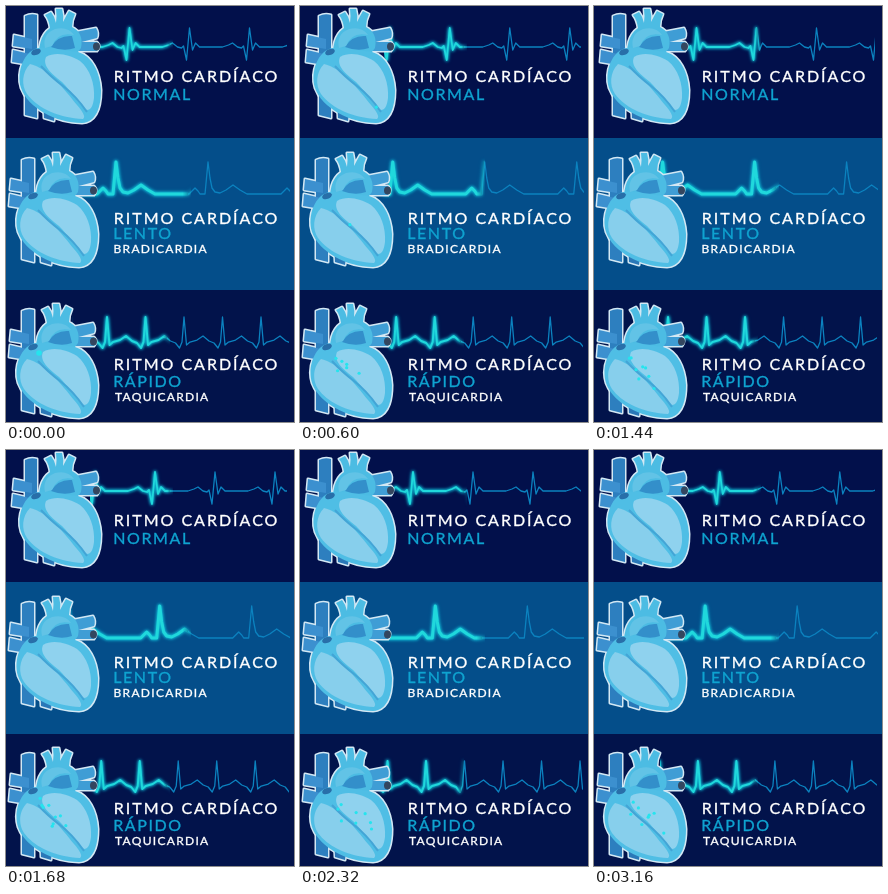
An HTML page for the animation above (3200 ms loop, 288 by 416 pixels).

```html
<!DOCTYPE html>
<html lang="es">
<head>
<meta charset="utf-8">
<title>Ritmo cardíaco</title>
<style>
html, body { margin: 0; width: 100%; height: 100%; overflow: hidden; background: #02104b; }
svg { display: block; width: 288px; height: 416px; }
text { font: 16px Lato, "Open Sans", sans-serif; letter-spacing: 2px; fill: #fff; stroke: #fff; stroke-width: .35px; }
.kind { letter-spacing: 1.6px; fill: #0fa3d0; stroke: #0fa3d0; }
.term { font-size: 12px; letter-spacing: 1.3px; }
.wave { fill: none; stroke-linejoin: round; }
.dot { fill: #25e4ee; }
</style>
</head>
<body>
<svg id="stage" viewBox="0 0 288 416">
  <defs>
    <linearGradient id="fade">
      <stop offset=".93" stop-color="#fff"/><stop offset="1" stop-color="#fff" stop-opacity=".2"/>
    </linearGradient>
    <g id="parts">
      <path fill="#2d7fbf" d="M19 10Q25 7 31 9V112L19 109Z"/>
      <path fill="#2a78b8" d="M37 88H51L48 115L38 112Z"/>
      <path fill="#3c90cf" d="M8 29L26 33V43L7 40Z M7 44L24 48V59L6 56Z"/>
      <path fill="#3f9dd5" d="M64 27L90 22Q93 27 91 32L64 39Z M68 36H91Q95 40 91 45H68Z"/>
      <path fill="#4cbce3" d="M34 58Q30 32 44 22Q43 14 39 9L45 6Q49 11 50 17Q51 9 50 3H56Q58 10 57 16Q60 10 63 5L69 8Q66 14 66 21Q78 27 75 42L60 62Z"/>
      <path fill="#4fbee5" d="M33 42C18 44 10 66 15 82C22 102 50 117 76 117C91 116 95 100 95 84C94 66 86 50 72 46C56 44 46 40 33 42Z"/>
    </g>
    <g id="heart">
      <use href="#parts" stroke="#d3e8f4" stroke-width="3" stroke-linejoin="round"/>
      <use href="#parts"/>
      <ellipse cx="90.5" cy="40.5" rx="3.5" ry="4" fill="#33465f"/>
      <path fill="#338fca" d="M45 41Q52 29 66 30L69 42Q58 46 45 41Z"/>
      <path fill="#62c3e6" d="M39 42Q36 28 49 23Q62 20 68 29Q52 25 46 40Z"/>
      <path fill="#87cfec" d="M24 58C16 66 15 79 21 88C32 103 54 112 77 113C80 111 77 106 71 99C58 83 42 62 24 58Z"/>
      <path fill="#8fd2ee" d="M40 51C50 45 64 49 74 55C84 63 89 78 88 92C87 100 85 104 81 104C72 98 66 86 56 76C46 68 36 60 40 51Z"/>
      <path fill="none" stroke="#43a5d6" stroke-width="2" d="M35 60Q44 70 57 80T81 106"/>
      <ellipse cx="30" cy="46" rx="5" ry="3" transform="rotate(-20 30 46)" fill="#286fa9"/>
    </g>
  </defs>
  <rect width="288" height="132" fill="#02104b"/>
  <rect y="132" width="288" height="152" fill="#044e8a"/>
  <rect y="284" width="288" height="132" fill="#02134b"/>
  <g id="waves"></g>
  <use href="#heart"/>
  <use href="#heart" x="-3" y="144"/>
  <use href="#heart" x="-3" y="295"/>
  <g id="dots"></g>
  <text x="107.7" y="76">RITMO CARDÍACO</text>
  <text x="107.2" y="93.5" class="kind">NORMAL</text>
  <text x="107.7" y="217.5">RITMO CARDÍACO</text>
  <text x="107.2" y="233" class="kind">LENTO</text>
  <text x="107.5" y="247" class="term">BRADICARDIA</text>
  <text x="107.7" y="364">RITMO CARDÍACO</text>
  <text x="107.2" y="381" class="kind">RÁPIDO</text>
  <text x="109" y="395" class="term">TAQUICARDIA</text>
</svg>
<script>
const LOOP = 3200, STEP = 40;
const $ = id => document.getElementById(id);

function add(parent, tag, attrs) {
  const el = document.createElementNS("http://www.w3.org/2000/svg", tag);
  for (const k in attrs) el.setAttribute(k, attrs[k]);
  return parent.appendChild(el);
}

// beat: x,y offsets from the main peak; beats: periods scrolled per loop
const rhythms = [
  { y: 41, peak: 123.5, period: 60, beats: 3, from: 84, split: 167, to: 281, width: 1.8,
    beat: [-27,0, -21,-2, -17,-4, -12,0, -8,1, -6,-1, -3,13, 0,-19, 3,3, 6,-4, 10,0, 24,0] },
  { y: 188, peak: 110, period: 92, beats: 1, from: 65, split: 185, to: 284, width: 3,
    beat: [-40,0, -19,0, -16,-3, -13,-6, -10,-3, -8,0, -3,0, 0,-32, 2,-16, 4,-6, 7,-2, 12,-1, 18,-4, 25,-9, 32,-4, 39,0, 52,0] },
  { y: 335, peak: 101, period: 38.5, beats: 6, from: 66, split: 164, to: 283, width: 2,
    beat: [-2,1, 0,-24, 2.5,4, 6,1, 13,-1, 19,-5, 25,0, 30,2, 34,7] }
];

function buildWave(r, i) {
  let d = "";
  for (let n = -2; n < 10; n++)
    for (let k = 0; k < r.beat.length; k += 2)
      d += (d ? "L" : "M") + (n * r.period + r.beat[k]) + " " + r.beat[k + 1];
  const defs = document.querySelector("defs");
  const box = { x: r.from, y: r.y - 60, width: r.split - r.from, height: 110 };
  const mask = add(defs, "mask", { id: "lit" + i, maskUnits: "userSpaceOnUse", ...box });
  add(mask, "rect", { ...box, fill: "url(#fade)" });
  const clip = add(defs, "clipPath", { id: "rest" + i });
  add(clip, "rect", { ...box, x: r.split - 3, width: r.to - r.split + 3 });

  const dim = add($("waves"), "g", { "clip-path": `url(#rest${i})` });
  const lit = add($("waves"), "g", { mask: `url(#lit${i})` });
  const glow = add(lit, "g", { style: "filter:drop-shadow(0 0 1.5px #10c4d8) drop-shadow(0 0 1.5px #0aa0c8)" });
  r.lines = [
    add(dim, "path", { class: "wave", d, stroke: "#0b82bf", "stroke-width": 1.3 }),
    add(glow, "path", { class: "wave", d, stroke: "#20d8dc", "stroke-width": r.width })
  ];
}
rhythms.forEach(buildWave);

let seed = 11;
const rand = () => (seed = seed * 16807 % 2147483647) / 2147483647;

// blood cells: each runs from the valve to its own place in the chambers
const cells = [];
function addCell(born, life, x0, y0, x1, y1, r = 1.6) {
  cells.push({ born, life, x0, y0, x1, y1, el: add($("dots"), "circle", { class: "dot", r }) });
}
addCell(0, 500, 33, 347, 60, 372, 2.8);
for (let born = 60; born < LOOP; born += 95) {
  const a = rand();
  addCell(born, 800, 34, 348, 38 + 38 * a, 356 + 12 * a + 24 * rand());
}
for (const born of [300, 2400]) {
  addCell(born, 500, 36, 60, 84, 109);
  addCell(born + 200, 500, 33, 200, 80, 252);
}

function draw(t) {
  for (const r of rhythms) {
    const shift = t / LOOP * r.beats * r.period % r.period;
    for (const line of r.lines)
      line.setAttribute("transform", `translate(${r.peak - shift} ${r.y})`);
  }
  for (const c of cells) {
    const p = (t - c.born) / c.life, live = p >= 0 && p < 1;
    c.el.style.display = live ? "" : "none";
    if (!live) continue;
    const e = p * (2 - p);
    c.el.setAttribute("cx", c.x0 + (c.x1 - c.x0) * e);
    c.el.setAttribute("cy", c.y0 + (c.y1 - c.y0) * e);
  }
}

const start = performance.now();
function frame() {
  const t = (performance.now() - start) % LOOP;
  draw(Math.floor(t / STEP) * STEP);
  requestAnimationFrame(frame);
}
frame();
</script>
</body>
</html>
```
